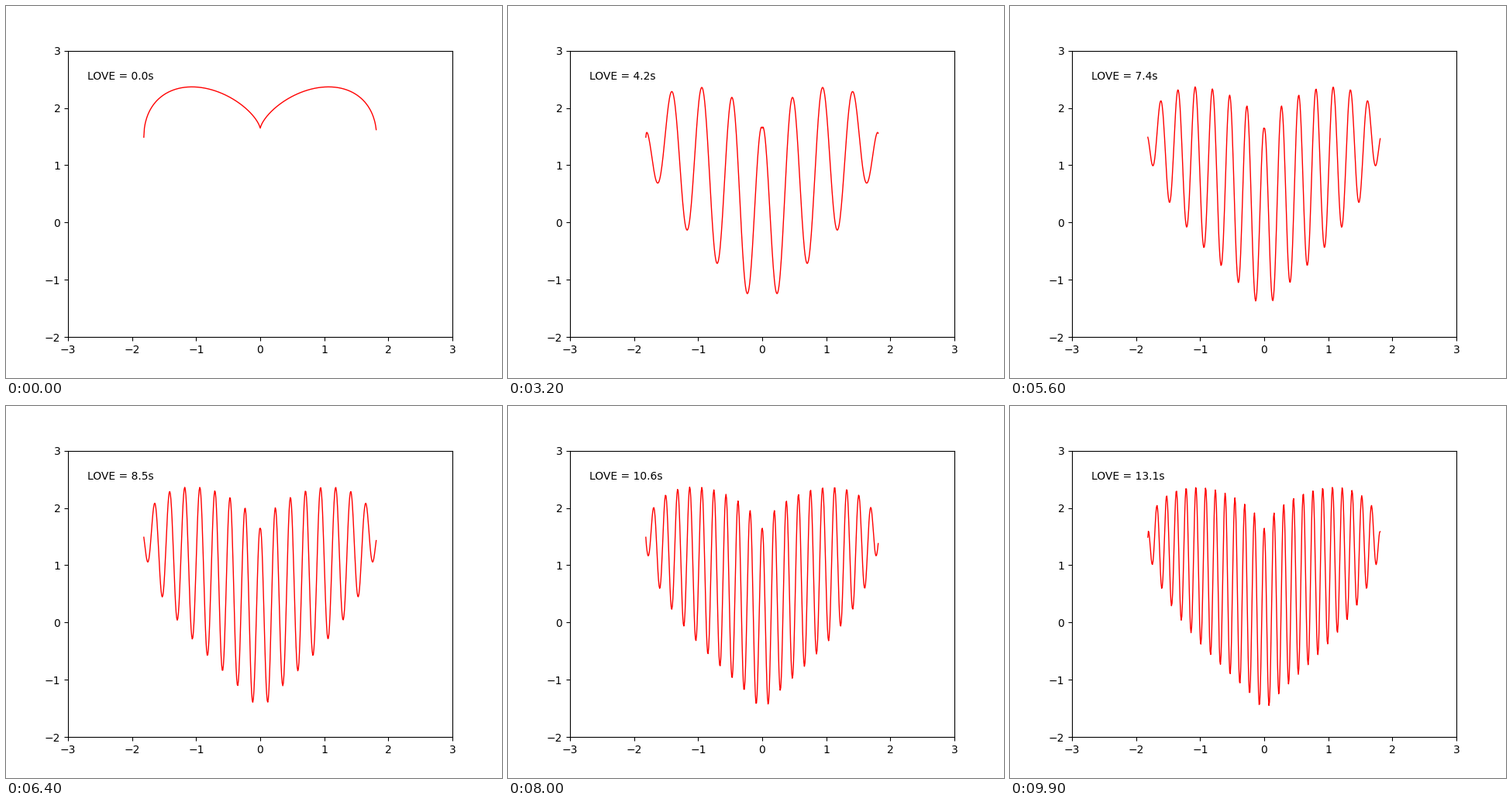
These frames come from a looping animation (640 by 480 pixels, 10 s). A matplotlib script:

```python
import numpy as np
import matplotlib.pyplot as plt
from matplotlib.animation import FuncAnimation

FRAMES = 100
INTERVAL = 100  # ms
STEP = 5 / 12   # angular frequency gained per frame

plt.rcParams["font.family"] = "DejaVu Sans"

fig, ax = plt.subplots(figsize=(6.4, 4.8), dpi=100)
ax.set_xlim(-3, 3)
ax.set_ylim(-2, 3)

edge = np.sqrt(3.3)
x = np.arange(-edge, edge, 0.009)
base = np.abs(x) ** (2 / 3)
envelope = 0.9 * np.sqrt(np.maximum(3.3 - x**2, 0))

line, = ax.plot([], [], color="red", lw=1)
label = ax.text(0.05, 0.9, "", transform=ax.transAxes)


def update(i):
    k = i * STEP
    line.set_data(x, base + envelope * np.cos(k * x))
    label.set_text(f"LOVE = {k / np.pi:.1f}s")
    return line, label


anim = FuncAnimation(fig, update, frames=FRAMES, interval=INTERVAL,
                     repeat=True, repeat_delay=0)
plt.show()
```
